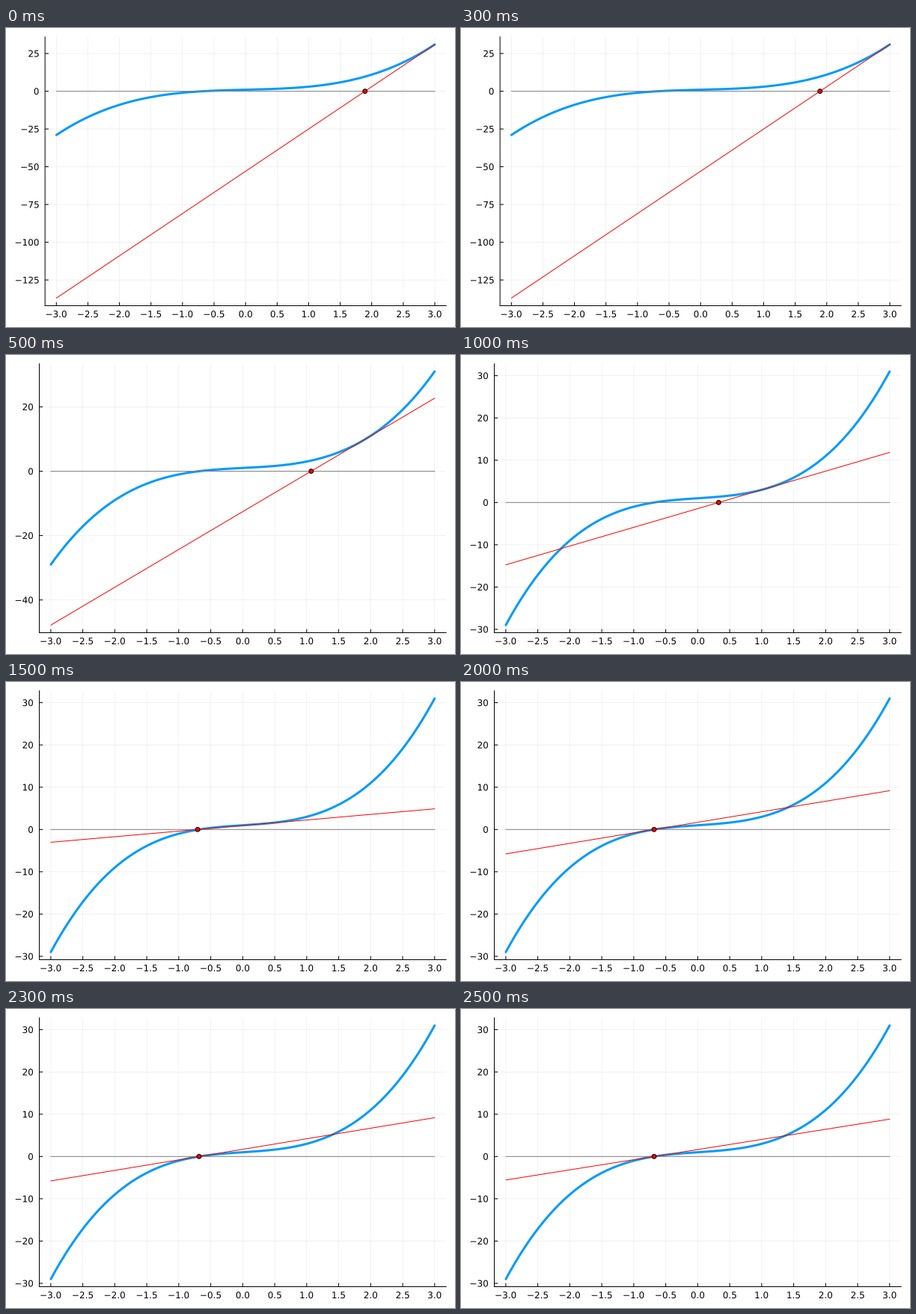
A matplotlib script for the animation above (3000 ms loop, 600 by 400 pixels).

```python
import numpy as np
import matplotlib.pyplot as plt
from matplotlib.animation import FuncAnimation
from matplotlib.patches import Circle, PathPatch
from matplotlib.textpath import TextPath
from matplotlib.transforms import Affine2D

W, H, DPI = 600, 400, 100
PX = 72 / DPI  # one pixel in points
RIGHT, TOP, BOTTOM = 588.2, 11.8, 371.5
TICK, FONT_SIZE = 4.7, 12
XMAX, MARGIN = 3, 0.03
START, STEPS = 3.0, 6
BLUE = "#009AFA"

# lines keep their exact subpixel positions
plt.rcParams.update({
    "font.family": "DejaVu Sans",
    "path.snap": False,
    "axes.linewidth": PX,
    "lines.solid_capstyle": "round",
})


def f(x):
    return x**3 + x + 1


def slope(x):
    return 3 * x**2 + 1


def newton(x):
    return x - f(x) / slope(x)


def padded(low, high):
    pad = MARGIN * (high - low)
    return low - pad, high + pad


def tick_step(span):
    if span > 120:
        return 25
    return 20 if span > 70 else 10


fig = plt.figure(figsize=(W / DPI, H / DPI), dpi=DPI, facecolor="white")
ax = fig.add_axes([0.1, 0.1, 0.8, 0.8])
pixels = Affine2D().scale(1 / DPI) + fig.dpi_scale_trans
xs = np.linspace(-XMAX, XMAX, 241)
ends = np.array([-XMAX, XMAX])


def to_pixels(x, y):
    return (ax.transData + pixels.inverted()).transform((x, y))


def label(text, x, y, align):
    """Write text with its baseline at y; align is 0.5 centred, 1 right."""
    path = TextPath((0, 0), text.replace("-", "\u2212"), size=FONT_SIZE)
    box = path.get_extents()
    shift = box.x0 + align * box.width
    ax.add_artist(PathPatch(path, fc="black", lw=0, clip_on=False,
                            transform=Affine2D().translate(x - shift, y)
                            + pixels))


def tick(x, y, dx, dy):
    ax.plot([x, x + dx], [y, y + dy], color="black", lw=PX,
            solid_capstyle="butt", transform=pixels)


def draw_axes(low, high):
    xlim, ylim = padded(-XMAX, XMAX), padded(low, high)
    step = tick_step(high - low)
    xticks = np.arange(-XMAX, XMAX + 0.1, 0.5)
    yticks = np.arange(np.ceil(ylim[0] / step), ylim[1] / step) * step
    names = [f"{int(y)}" for y in yticks]

    # the plot area makes room for the widest label
    left = 44.5 + 0.636 * FONT_SIZE * (max(map(len, names)) - 3)
    ax.set_position([left / W, 1 - BOTTOM / H,
                     (RIGHT - left) / W, (BOTTOM - TOP) / H])
    ax.set(xlim=xlim, ylim=ylim, xticks=xticks, yticks=yticks)
    ax.set_axisbelow(True)
    ax.grid(color="black", alpha=0.1, linewidth=0.5 * PX)
    ax.tick_params(length=0, labelleft=False, labelbottom=False)
    ax.spines[["top", "right"]].set_visible(False)

    for value in xticks:
        x, y = to_pixels(value, ylim[0])
        tick(x, y, 0, TICK)
        label(f"{value:.1f}", x, y - 15.5, 0.5)
    for value, name in zip(yticks, names):
        x, y = to_pixels(xlim[0], value)
        tick(x, y, TICK, 0)
        label(name, x - 8.5, y - 4.5, 1)


def draw(i):
    x = START
    for _ in range(i):
        x = newton(x)
    tangent = f(x) + slope(x) * (ends - x)

    ax.clear()
    draw_axes(min(f(-XMAX), tangent[0]), max(f(XMAX), tangent[1]))
    ax.plot(xs, f(xs), color=BLUE, lw=3 * PX)
    ax.plot(ends, [0, 0], color="gray", lw=PX)
    ax.plot(ends, tangent, color="red", lw=PX)
    ax.add_artist(Circle(to_pixels(newton(x), 0), 2.9, fc="red", ec="black",
                         lw=PX, zorder=4, transform=pixels))
    return []


anim = FuncAnimation(fig, draw, frames=STEPS, init_func=lambda: [],
                     interval=500, repeat=True, repeat_delay=0)
plt.show()
```
